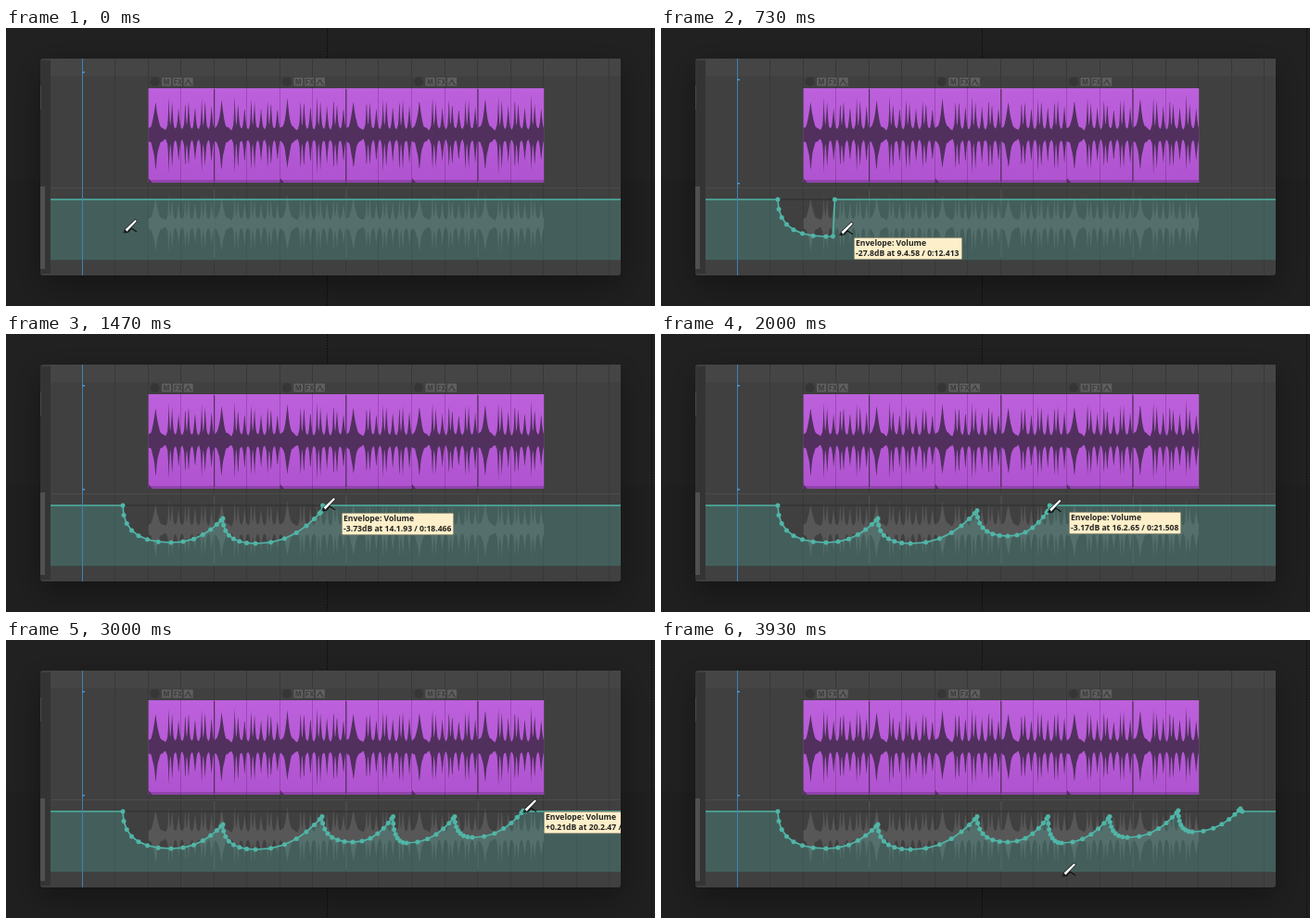
An HTML page with a canvas for the animation above (4 s loop, 700 px wide and 300 px high).

```html
<!DOCTYPE html>
<html lang="en">
<head>
<meta charset="utf-8">
<title>Volume envelope</title>
<style>
html, body { margin: 0; width: 100%; height: 100%; overflow: hidden; background: #1f1f1f; }
canvas { display: block; }
</style>
</head>
<body>
<canvas id="stage" width="700" height="300"></canvas>
<script>
const ctx = document.getElementById('stage').getContext('2d');
const BASE = 185, LANE_END = 250.5, RIGHT = 663;
const BAR = 35.55, BEAT = BAR / 4, ITEM_X = 153.6, ITEM_W = 4 * BAR;
const TEAL = '#50b5a7', DOTS = 14;

// Each dip falls from its peak to a low point, then rises to the next peak.
const peaks = [
  { t: 420, x: 126, y: 185, low: [178, 225] },
  { t: 1000, x: 234, y: 199, low: [269, 226] },
  { t: 1490, x: 341, y: 190.5, low: [374, 218] },
  { t: 2015, x: 417.5, y: 190.5, low: [432, 219] },
  { t: 2485, x: 484, y: 190.5, low: [503, 213] },
  { t: 3010, x: 558, y: 184, low: [573, 207] },
  { t: 3600, x: 625, y: 182 }
];
const PRESS = peaks[0].t, RELEASE = 3770;

const mix = (a, b, k) => a + (b - a) * k;
const clamp = k => Math.min(1, Math.max(0, k));

function dipPoint(i, u) {
  const from = peaks[i], to = peaks[i + 1], [lowX, lowY] = from.low;
  if (u < .5) {
    const s = 2 * u;
    return [mix(from.x, lowX, s * s), mix(lowY, from.y, (1 - s) ** 2)];
  }
  const s = 1 - (2 - 2 * u) ** 1.7;
  return [mix(lowX, to.x, s), mix(lowY, to.y, s ** 2.3)];
}

function dipProgress(i, t) {
  return clamp((t - peaks[i].t) / (peaks[i + 1].t - peaks[i].t));
}

function mouseAt(t) {
  let i = peaks.length - 2;
  while (i > 0 && t < peaks[i].t) i--;
  return dipPoint(i, dipProgress(i, t));
}

function drawnPoints(t) {
  const list = [];
  for (let i = 0; i < peaks.length - 1 && t >= peaks[i].t; i++) {
    const u = dipProgress(i, t);
    for (let n = 0; n < DOTS && n / DOTS <= u; n++) list.push(dipPoint(i, n / DOTS));
  }
  if (list.length) {
    const mouse = mouseAt(t);
    list.push(mouse, [mouse[0] + 2, BASE]);
  }
  return list;
}

function rect(x, y, w, h, color) {
  ctx.fillStyle = color;
  ctx.fillRect(x, y, w, h);
}

function dot(x, y, r, color) {
  ctx.fillStyle = color;
  ctx.beginPath();
  ctx.arc(x, y, r, 0, 7);
  ctx.fill();
}

function trace(list) {
  ctx.beginPath();
  list.forEach(([x, y]) => ctx.lineTo(x, y));
}

function fill(list, color) {
  trace(list);
  ctx.fillStyle = color;
  ctx.fill();
}

function stroke(list, color, width) {
  trace(list);
  ctx.strokeStyle = color;
  ctx.lineWidth = width;
  ctx.stroke();
}

function text(s, x, y, font, color) {
  ctx.font = font;
  ctx.fillStyle = color;
  ctx.fillText(s, x, y);
}

// Every two beats: a thin leading spike, the main hit and a softer echo.
function loudness(x) {
  const u = (x - ITEM_X) % (ITEM_W / 2);
  let top = 1.5;
  const hit = (at, height, width) => {
    const d = Math.abs(u - at) / width;
    top = Math.max(top, height * Math.exp(-d), height * .28 * Math.exp(-d * d / 12));
  };
  for (let q = 0; q < 4; q++) {
    const at = 7.8 + q * 2 * BEAT;
    hit(at, 40, q ? 1.4 : 3.4);
    if (q) hit(at - 3.6, 45, 1);
    if (q) hit(at + 7, 33, 1.7);
  }
  return top;
}

function wave(mid, scale, color) {
  const top = [], bottom = [];
  for (let x = ITEM_X; x < ITEM_X + 3 * ITEM_W; x += .5) {
    const h = loudness(x) * scale;
    top.push([x, mid - h * (.95 + .05 * Math.sin(x))]);
    bottom.unshift([x, mid + h * (.95 - .05 * Math.sin(x * 1.7))]);
  }
  fill(top.concat(bottom), color);
}

function backdrop() {
  rect(0, 0, 700, 163, '#212121');
  rect(0, 163, 700, 137, '#1f1f1f');
  for (const x of [346, 696])
    for (let y = 0; y < 300; y += 3) rect(x, y, 1, 2, '#101010');
  ctx.save();
  ctx.shadowColor = 'rgba(0,0,0,.35)';
  ctx.shadowBlur = 32;
  ctx.shadowOffsetY = 10;
  ctx.fillStyle = '#404040';
  ctx.beginPath();
  ctx.roundRect(37, 33, 626, 234, 3);
  ctx.fill();
  ctx.restore();
  rect(37, 35, 11, 230, '#343434');
  rect(37, 171, 5, 89, '#505050');
  rect(37, 62, 1, 26, '#4a4a4a');
  rect(48, 33, 615, 19, '#454545');
  for (let x = ITEM_X - 2 * BAR; x < RIGHT; x += BAR) rect(Math.round(x) - 1, 33, 1, 234, '#383838');
  rect(48, 172, 615, 1, '#4c4c4c');
  rect(48, 250, 615, 1, '#393939');
}

function items() {
  for (let i = 0; i < 3; i++) {
    const x = ITEM_X + i * ITEM_W;
    dot(x + 7, 58, 5, '#363636');
    ['M', 'FX', ''].forEach((label, j) => {
      const left = x + 14.5 + j * 11.8;
      rect(left, 53.5, 10, 9, '#5f5f5f');
      text(label, left + (j ? 1 : 1.7), 60.7, 'bold 7px Inter, sans-serif', '#3b3b3b');
    });
    stroke([[x + 39.5, 61], [x + 43, 56], [x + 45, 60], [x + 47, 61]], '#3b3b3b', 1.2);
  }
  const purple = ctx.createLinearGradient(0, 65, 0, 167);
  purple.addColorStop(0, '#bd60dc');
  purple.addColorStop(1, '#b053d0');
  rect(ITEM_X, 65, 3 * ITEM_W, 102, purple);
  rect(ITEM_X, 164, 3 * ITEM_W, 3, '#8f43aa');
  for (let i = 1; i < 12; i++) rect(Math.round(ITEM_X + i * BAR) - 1, 65, 1, 102, 'rgba(60,20,75,.25)');
  wave(115, 1, '#51305e');
  for (let i = 0; i < 3; i++) {
    const x = ITEM_X + i * ITEM_W;
    rect(x + ITEM_W / 2 - .7, 66, 1.2, 99, '#51305e');
    fill([[x, 162], [x + 4, 167], [x, 167]], '#51305e');
  }
}

function envelope(t) {
  wave(211, .78, '#575757');
  for (let i = 0; i < 3; i++) rect(ITEM_X + (i + .5) * ITEM_W - .5, 174, 1, 74, '#575757');
  rect(48, BASE - .5, 615, 1, '#2d2d2d');
  const dots = drawnPoints(t);
  const line = [[48, BASE], ...dots, [RIGHT, BASE]];
  fill([...line, [RIGHT, LANE_END], [48, LANE_END]], 'rgba(80,181,167,.26)');
  stroke(line, TEAL, 1.7);
  for (const [x, y] of dots) dot(x, y, 2.5, TEAL);
}

function playhead(started) {
  rect(82, 33, 1, 234, '#3c82b8');
  for (const y of started ? [55, 167] : [47]) rect(82, y, 3, 1.5, '#4b9ad2');
}

function tooltip([x, y]) {
  const d = y - BASE;
  const db = d > 0 ? -.5 * d - .005 * d * d : -.28 * d;
  const beats = 32 + (x - ITEM_X) / BEAT;
  const seconds = (beats * 60 / 172).toFixed(3).padStart(6, '0');
  const level = (db < 0 ? '-' : '+') + Math.abs(db).toFixed(db <= -10 ? 1 : 2);
  const part = String(Math.floor(beats % 1 * 100)).padStart(2, '0');
  const place = `${Math.floor(beats / 4) + 1}.${Math.floor(beats % 4) + 1}.${part}`;
  const label = `${level}dB at ${place} / 0:${seconds}`;
  const font = '600 8.6px "Noto Sans", sans-serif';
  const left = Math.round(x + 22.5), top = Math.round(y + 1);
  ctx.font = font;
  const w = Math.round(ctx.measureText(label).width + 5);
  rect(left, top, w, 24, '#4b473b');
  rect(left + .5, top + .5, w - 1, 23, '#fcefc9');
  text('Envelope: Volume', left + 2, top + 9.3, font, '#222');
  text(label, left + 2, top + 20.3, font, '#222');
}

function penAt(t) {
  if (t < PRESS) return [127, mix(221, 186, clamp(t / 400))];
  if (t < RELEASE) return mouseAt(t + 25);
  const k = clamp((t - 3733) / 200);
  return [mix(624, 433, k), mix(182, 255, k)];
}

function pen([x, y]) {
  ctx.save();
  ctx.translate(x, y);
  ctx.lineJoin = 'round';
  stroke([[1, 0], [5, -1], [8, -5], [11, -3], [14, -1]], '#111', 1.2);
  const body = [[0, 0], [2, -4], [12.5, -14], [14, -12.5], [4, -2]];
  stroke(body, '#111', 1.3);
  fill(body, '#fff');
  fill([[-.5, .5], [1.5, -3.5], [3.5, -1.5]], '#111');
  ctx.restore();
}

function draw(now) {
  // The picture moves in 15 steps per second.
  const step = Math.floor((now + 4) * .015) % 60;
  const t = step * 1000 / 15;
  backdrop();
  items();
  ctx.save();
  ctx.beginPath();
  ctx.rect(37, 33, RIGHT - 37, 234);
  ctx.clip();
  envelope(t);
  playhead(step > 0);
  if (t >= PRESS && t < RELEASE) tooltip(mouseAt(t));
  pen(penAt(t));
  ctx.restore();
}

const start = performance.now();
function tick() {
  draw(performance.now() - start);
  requestAnimationFrame(tick);
}
tick();
</script>
</body>
</html>
```
